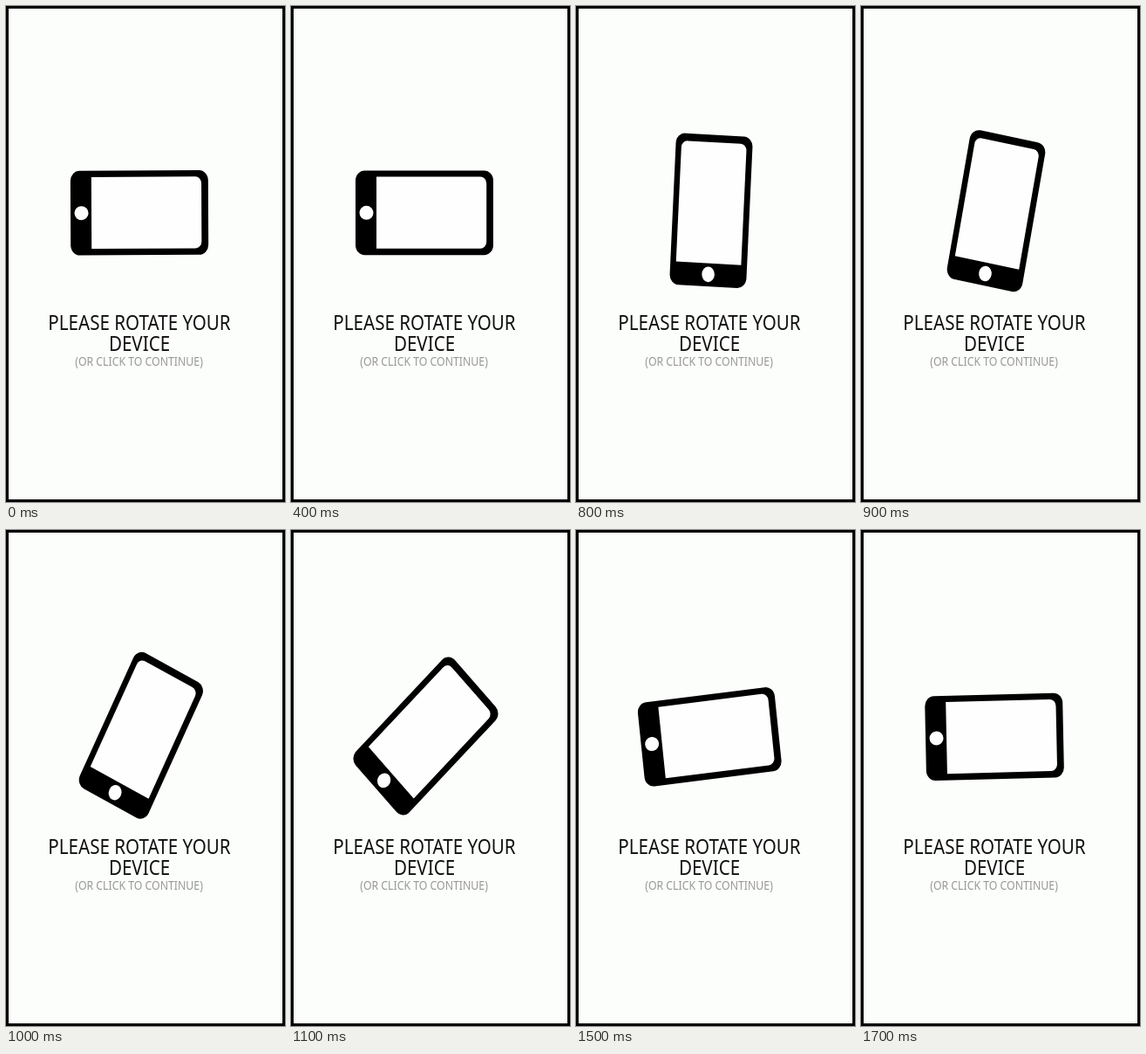
Write an HTML page that moves like this. It is 320 px wide and 568 px high and loops after 1.8 s.

```html
<!DOCTYPE html>
<html lang="en">
<head>
<meta charset="utf-8">
<title>Please rotate your device</title>
<style>
  html, body { margin: 0; width: 100%; height: 100%; overflow: hidden; background: #fcfefb; }
  svg { display: block; width: 100%; height: 100%; }
  text { font-family: "Noto Sans", "Open Sans", sans-serif; text-anchor: middle; }
  .title { font-size: 20.6px; fill: #101010; }
  .hint { font-size: 12.3px; fill: #989898; }
</style>
</head>
<body>
<svg viewBox="0 0 320 568">
  <rect x="1.5" y="1.5" width="317" height="565" fill="#fcfefb" stroke="#000" stroke-width="3"/>
  <g id="phone">
    <rect x="-78.8" y="-41.8" width="158" height="88" rx="10.5" fill="#000"/>
    <path d="M-54.8 -35.3H64.4a7 7 0 0 1 7 7V32.4a7 7 0 0 1 -7 7H-54.8Z" fill="#fdfefd"/>
    <ellipse cx="-66.3" cy="2.2" rx="8" ry="7.3" fill="#fdfefd"/>
  </g>
  <!-- The whole scene is stretched a little in height -->
  <g transform="translate(153 371.3) scale(1 1.1)">
    <text class="title">PLEASE ROTATE YOUR</text>
    <text class="title" y="21.8">DEVICE</text>
    <text class="hint" x="-0.5" y="37">(OR CLICK TO CONTINUE)</text>
  </g>
</svg>
<script>
const LOOP = 1800, STEP = 100, TURN_START = 664, TURN_TIME = 1230;
const phone = document.getElementById("phone");

// Same curve as cubic-bezier(0.4, 0, 0.2, 1)
function ease(x) {
  let lo = 0, hi = 1;
  for (let i = 0; i < 24; i++) {
    const s = (lo + hi) / 2, r = 1 - s;
    if (1.2 * s * r * r + 0.6 * s * s * r + s * s * s < x) lo = s;
    else hi = s;
  }
  return lo * lo * (3 - 2 * lo);
}

// Turn from upright to lying, rest, then snap upright again
function draw(ms) {
  const t = Math.floor((ms % LOOP) / STEP) * STEP;
  const since = (t - TURN_START + LOOP) % LOOP;
  const angle = 90 * ease(Math.min(since / TURN_TIME, 1)) - 90;
  phone.setAttribute("transform", `translate(152.8 234.4) scale(1 1.1) rotate(${angle})`);
}

let start;
function tick(now) {
  start ??= now;
  draw(now - start);
  requestAnimationFrame(tick);
}
draw(0);
requestAnimationFrame(tick);
</script>
</body>
</html>
```
